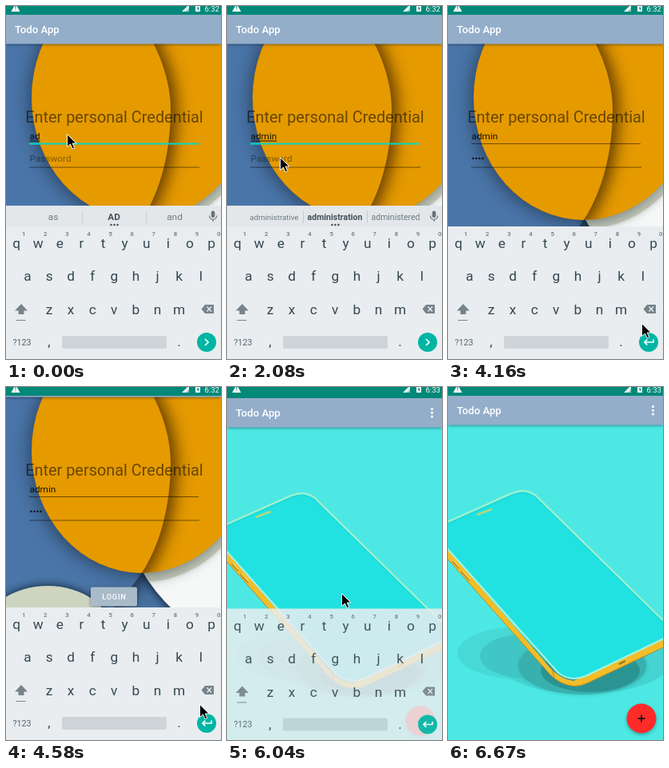
Recreate the animation shown at these times as an HTML page with a canvas. Size 269 px wide and 442 px high, loop 7590 ms.

```html
<!DOCTYPE html>
<html lang="en">
<head>
<meta charset="utf-8">
<title>Todo App login</title>
<style>
html, body { margin: 0; width: 100%; height: 100%; overflow: hidden; }
canvas { display: block; width: 269px; height: 442px; }
</style>
</head>
<body>
<canvas id="stage" width="269" height="442"></canvas>
<script>
const W = 269, H = 442, LOOP = 7590, TICK = 1000 / 4.8;
const TEAL = '#04d9c4', INK = '#37474f', GREY = '#76848a';
const c = document.getElementById('stage').getContext('2d');

function text(str, x, y, size, color, align = 'left', weight = 400) {
  c.font = `${weight} ${size}px Roboto, sans-serif`;
  c.textAlign = align;
  c.fillStyle = color;
  c.fillText(str, x, y);
  return c.measureText(str).width;
}

function box(x, y, w, h, color) {
  c.fillStyle = color;
  c.fillRect(x, y, w, h);
}

function oval(x, y, rx, ry, color) {
  c.beginPath();
  c.ellipse(x, y, rx, ry, 0, 0, 7);
  c.fillStyle = color;
  c.fill();
}

const disc = (x, y, r, color) => oval(x, y, r, r, color);

function shape(d, fill, stroke, width = 1) {
  const p = new Path2D(d);
  if (fill) { c.fillStyle = fill; c.fill(p); }
  if (stroke) { c.strokeStyle = stroke; c.lineWidth = width; c.stroke(p); }
}

function shade(color, blur, dx, dy, draw) {
  c.save();
  c.shadowColor = color;
  c.shadowBlur = blur;
  c.shadowOffsetX = dx;
  c.shadowOffsetY = dy;
  draw();
  c.restore();
}

function at(x, y, draw) {
  c.save();
  c.translate(x, y);
  draw();
  c.restore();
}

function within(d, draw) {
  c.save();
  c.clip(new Path2D(d));
  draw();
  c.restore();
}

// Last entry whose step has been reached
const pick = (list, k) => list.filter(e => e[0] <= k).pop().slice(1);

const NAME = [[0, 'ad'], [4, 'adm'], [6, 'admi'], [7, 'admin']];
const PASS = [[0, ''], [13, 't'], [14, '•'], [15, '•e'], [16, '••s'], [17, '•••t'], [18, '••••']];
const HINTS = {
  ad: ['as', 'AD', 'and'],
  adm: ['adm', 'ADM', 'admin'],
  admi: ['admit', 'admin', 'admire'],
  admin: ['administrative', 'administration', 'administered']
};
const SCROLL = [[0, 0], [21, -20], [22, -35], [23, -36.5]];
const POINTER = [[0, 76, 160], [8, 74, 168], [9, 70, 179], [10, 66, 189],
  [17, 125, 258], [18, 199, 348], [19, 235, 391], [20, 242, 397],
  [23, 160, 279], [24, 150, 267], [25, 143, 258], [30, 180, 330], [31, 230, 425], [32, 300, 460]];
const CARET = [2, 3, 4, 6, 7, 11, 12, 13, 15, 16, 17];

// Wallpaper outlines: the front sheet, the big circle and the white sheet
const SHEET = 'M-60 -40H120C180 20 206 80 206 130C206 180 194 232 169 269C156 288 140 306 126 320H-60Z';
const CIRCLE = 'M32 115A138 153 0 0 1 308 115A138 153 0 0 1 32 115Z';
const WHITE = 'M170 264Q185 292 211 316H300V180H200Z';

function statusBar(k) {
  box(0, 0, W, 11, '#008878');
  shape('M12 -3L17.5 7H6.5Z', '#fff');
  box(11.5, 0, 1, 3.5, '#008878');
  box(11.5, 4.5, 1, 1, '#008878');
  shape('M220 7L229 -2V3L225 7Z', '#e8f5f3');
  shape('M226 4L229 7M229 4L226 7', null, '#fff');
  box(237, -1, 6, 8, '#fff');
  shape('M240.5 0L238.5 3.5H240V6L242 2.5H240.5Z', '#008878');
  text(k < 27 ? '6:32' : '6:33', 248.5, 6.5, 9.5, '#fff');
}

function toolbar() {
  shade('rgba(0,20,40,.35)', 3, 0, 1, () => box(0, 11, W, 36.5, '#94aeca'));
  text('Todo App', 11, 34, 13.2, '#fff', 'left', 500);
}

function wallpaper() {
  const orange = '#e59a00', blue = '#4a75a8';
  box(0, 11, W, 350, '#46709f');
  shade('rgba(18,34,52,.85)', 20, 5, 2, () => shape(SHEET, blue));
  shade('rgba(10,25,40,.8)', 10, -3, 0, () => shape(WHITE, '#f6f7f7'));
  within(WHITE, () =>
    shade('#d2d6c8', 5, 0, 0, () => oval(171, 119, 144, 160, '#c8cdbb')));
  shade('rgba(10,25,40,.7)', 10, 0, -2, () => oval(52, 342, 80, 58, '#cdd5c0'));
  shade('rgba(20,35,50,.55)', 20, -4, 3, () => shape(CIRCLE, orange));
  within(CIRCLE, () =>
    shade('rgba(60,32,0,.8)', 20, 7, 1, () => shape(SHEET, orange)));
}

function field(str, y, lineY, right, focused) {
  if (focused) box(29, lineY - .5, right - 29, 2, TEAL);
  else box(29, lineY, right - 29, 1, 'rgba(0,0,0,.5)');
  return text(str, 29.5, y, 11.8, 'rgba(0,0,0,.87)');
}

function login(k) {
  const [name] = pick(NAME, k), [pass] = pick(PASS, k), [dy] = pick(SCROLL, k);
  const first = k < 11, second = !first && k < 20;
  at(0, dy, () => {
    wallpaper();
    toolbar();
    text('Enter personal Credential', 135.4, 145.6, 19.9, 'rgba(0,0,0,.54)', 'center');
    const w = field(name, 167, 172, 241, first);
    if (first) box(29.5, 168.5, w, 1, '#111');
    if (!pass) text('Password', 29.5, 195, 11.8, 'rgba(0,0,0,.42)');
    const pw = field(pass, 195, 201.5, 242, second);
    if (CARET.includes(k)) {
      if (first) box(29 + w, 154, 1.5, 17, TEAL);
      else box(29.5 + pw, 183, 1.3, 14, TEAL);
    }
    shade('rgba(0,0,0,.4)', 4, 0, 1, () => {
      c.beginPath();
      c.roundRect(106, 285.5, 58, 24, 2);
      c.fillStyle = k < 24 ? '#a9bac9' : '#94abc6';
      c.fill();
    });
    c.letterSpacing = '0.8px';
    text('LOGIN', 135.4, 301, 9.2, '#fff', 'center', 500);
    c.letterSpacing = '0px';
  });
}

function fitted(str, x, max, color, weight) {
  c.font = `${weight} 11.8px Roboto, sans-serif`;
  const size = 11.8 * Math.min(1, max / c.measureText(str).width);
  text(str, x, 267.5, size, color, 'center', weight);
}

function suggestions(words) {
  box(0, 250, W, 26.5, '#e3e7ea');
  words.forEach((w, i) =>
    i === 1 ? fitted(w, 135, 69, '#435359', 700) : fitted(w, 59 + 76 * i, 61, '#6d7b81', 400));
  box(95, 256, 1, 16, '#c6cdd1');
  box(175, 256, 1, 16, '#c6cdd1');
  for (const x of [131.5, 135.5, 139.5]) disc(x, 274, 1.2, INK);
  c.beginPath();
  c.roundRect(256.7, 256.5, 4.6, 8.5, 2.3);
  c.fillStyle = '#65747a';
  c.fill();
  shape('M254.5 262.5C254.5 269 263.5 269 263.5 262.5M259 267V270', null, '#65747a', 1.2);
}

function keyRow(keys, x0, y) {
  [...keys].forEach((ch, i) => text(ch, x0 + 27.1 * i, y, 17.3, INK, 'center'));
}

function keyboard(k, panel = 1, keys = 1) {
  c.globalAlpha = panel;
  box(0, 276, W, 180, '#e9edf0');
  c.globalAlpha = keys;
  keyRow('qwertyuiop', 13.2, 303);
  keyRow('asdfghjkl', 27, 344);
  keyRow('zxcvbnm', 54, 386);
  for (let i = 0; i < 10; i++)
    text((i + 1) % 10, 22.2 + 27.1 * i, 288, 7.8, '#6b787e', 'center', 500);

  shape('M19 373L27 381.5H22.5V386H15.5V381.5H11Z', GREY);
  box(12.5, 393, 12, 1, GREY);
  shape('M244.5 379.5L249 374H260V385H249Z', GREY);
  shape('M251.5 376.5L257 382.5M257 376.5L251.5 382.5', null, '#e9edf0', 1.3);

  text('?123', 20, 424.5, 10.7, '#53636a', 'center');
  text(',', 54, 426, 17, INK, 'center');
  text('.', 216.5, 426, 17, INK, 'center');
  c.beginPath();
  c.roundRect(70, 413, 131, 16, 2);
  c.fillStyle = 'rgba(55,71,79,.15)';
  c.fill();

  disc(251, 421, 12, '#00b5a4');
  const icon = k < 11 ? 'M249 417L253 421L249 425'
    : k < 20 ? 'M245.5 421L249.2 424.7L256.5 417.3'
    : 'M257 417.5V421H246M249.3 417.7L246 421L249.3 424.3';
  shape(icon, null, '#fff', 1.7);
  c.globalAlpha = 1;
}

function phone() {
  box(0, 11, W, H, '#4de8e4');
  oval(90, 333, 78, 33, '#47d9d6');
  oval(170, 344, 108, 40, '#45d4d1');
  oval(98, 337, 58, 28, '#40c7c5');
  shade('#38b4b2', 5, 0, 0, () => oval(168, 349, 80, 36, '#37b0ae'));
  oval(178, 355, 62, 27, '#2a9493');

  shape('M-3 200L128 352Q141 366 157 368L272 314V324L176 370Q166 375 157 374.5Q141 373 128 360L-3 212Z', '#f3bd28');
  shape('M-3 212.5L128 360.5Q141 373 157 374.5Q166 375 176 370L272 325', null, '#b98a25', 1);
  shape('M-3 170L80 133Q97 126 110 136L272 295V314L172 362Q152 370 138 357L-3 199Z', '#21e2e1');
  shape('M-3 200L137 357Q152 370 172 362L272 314', null, '#a2f4e0', 2.2);
  shape('M-3 170L80 133Q97 126 110 136L272 295', null, '#a8f0cb', 2);
  shape('M-3 173L81 135.5Q97 129 109 138.5L272 298', null, 'rgba(25,190,190,.4)', 1);
  shape('M36 160L55 153', null, '#b3d97c', 2.5);
  shape('M6 218L14 227M17 231L27 242', null, '#a5852c', 2.5);
  shape('M7 217.5L14.5 226M18 230.5L27.5 241', null, '#ffd656', 1.5);
  shape('M129 350L133 363', null, '#a78531', 1);
  shape('M214 347L222 343', null, '#99731c', 2);
}

function todo(dy) {
  box(0, 11, W, 4, '#008878');
  at(0, dy, () => {
    phone();
    toolbar();
    for (const y of [24.5, 29.2, 33.9]) disc(256.5, y, 1.5, '#fff');
    shade('rgba(0,40,40,.35)', 4, 0, 2, () => disc(242, 415, 18.5, '#ff2b29'));
    box(237.5, 414.2, 9, 1.8, '#161616');
    box(241.1, 410.6, 1.8, 9, '#161616');
  });
}

function pointer(x, y) {
  at(x + .5, y + .5, () => shape(
    'M0 0V16L4 12.5L6.6 18.3L9.2 17.2L6.7 11.5H11.5Z', '#000', '#fff', 1));
}

function render(k) {
  c.clearRect(0, 0, W, H);
  if (k < 29) {
    login(k);
    if (k < 11) suggestions(HINTS[pick(NAME, k)[0]]);
    keyboard(k);
  } else {
    const left = Math.max(0, 31 - k);
    todo([0, 1, 3][left]);
    if (left === 2) at(0, 1.5, () => keyboard(k, .86, .92));
    if (left === 1) at(0, 8, () => keyboard(k, .2, .2));
  }
  statusBar(k);
  if (k === 29) box(0, 11, W, 3, '#008878');
  pointer(...pick(POINTER, k));
}

function frame(now) {
  const t = now % LOOP;
  render(Math.min(32, Math.floor((t + 10.5) / TICK)));
  requestAnimationFrame(frame);
}
requestAnimationFrame(frame);
</script>
</body>
</html>
```
